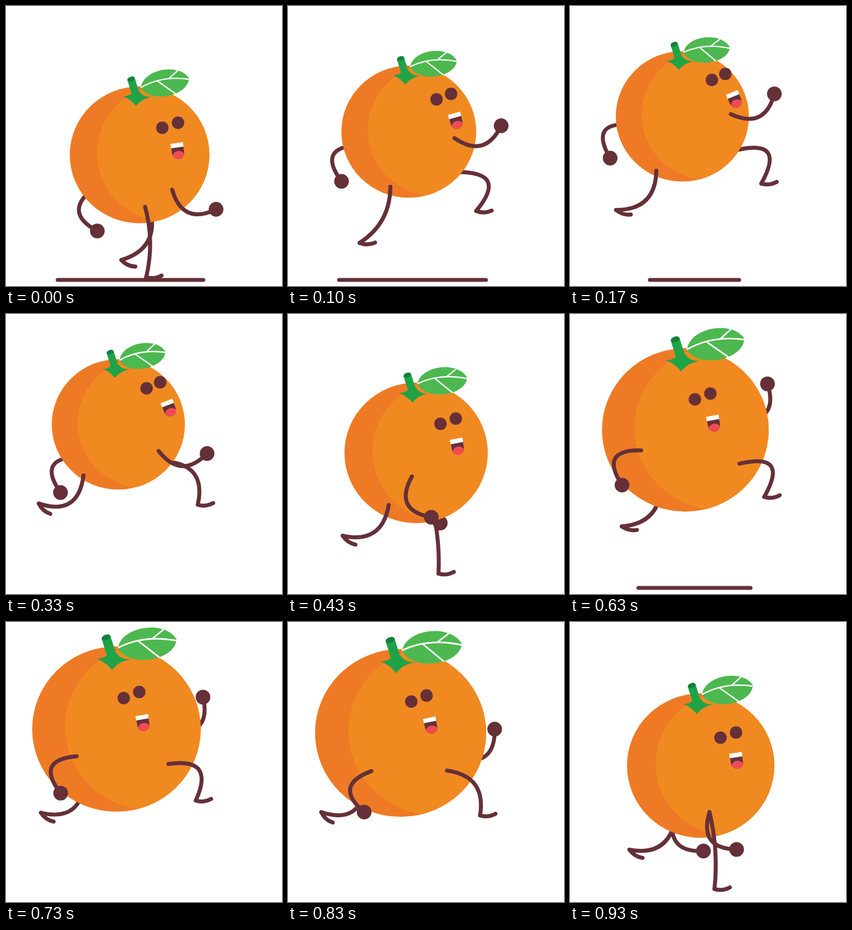
Animation of 500 by 506 pixels, one loop 0.96 s. Source, as an HTML page with a canvas:

```html
<!DOCTYPE html>
<html lang="en">
<head>
<meta charset="utf-8">
<title>Running orange</title>
<style>
  html, body { margin: 0; width: 100%; height: 100%; overflow: hidden; background: #fff; }
  canvas { display: block; }
</style>
</head>
<body>
<canvas id="stage" width="500" height="506"></canvas>
<script>
const ctx = document.getElementById('stage').getContext('2d');
const LOOP = 960, STEPS = 29, STRIDE = STEPS / 2, RAD = Math.PI / 180;
const BROWN = '#653038', SKIN = '#f18921', SHADE = '#ef7a25', STEM = '#1fa347', LEAF = '#4db84f';

// Periodic monotone cubic through rows of [step, ...values].
function track(rows) {
  const n = rows.length;
  const at = i => {
    const turn = Math.floor(i / n), [step, ...values] = rows[i - turn * n];
    return [step + turn * STEPS, ...values];
  };
  const slope = (i, j) => (at(i + 1)[j] - at(i)[j]) / (at(i + 1)[0] - at(i)[0]);
  const tangent = (i, j) => {
    const before = slope(i - 1, j), after = slope(i, j);
    return before * after > 0 ? 2 * before * after / (before + after) : 0;
  };
  return step => {
    let i = n - 1;
    while (i > 0 && rows[i][0] > step) i--;
    const a = at(i), b = at(i + 1), h = b[0] - a[0], u = (step - a[0]) / h, w = 1 - u;
    return a.slice(1).map((v, c) => v * w * w * (1 + 2 * u) + b[c + 1] * u * u * (3 - 2 * u)
      + h * u * w * (w * tangent(i, c + 1) - u * tangent(i + 1, c + 1)));
  };
}

// step, centre height, radius
const bodyTrack = track([
  [0, 269, 126.5], [5, 199.5, 120.5], [7.5, 193, 119.5], [10, 199.5, 120.5], [14.5, 267, 136],
  [16, 259.5, 142], [19, 209.5, 151], [22.5, 193, 153], [25, 200.5, 155], [28, 259.5, 133.5]]);

// step, hip, heel: one run cycle, shared by both legs half a loop apart
const legTrack = track([
  [0, 10, 94, 12, 221], [1.5, -18, 100, -52, 219], [5, -47, 98, -120, 169],
  [10, -63, 92, -144, 143], [13.5, -45, 95, -129, 152], [14.5, 20, 101, -33, 190],
  [16, 70, 91, 76, 175], [19, 98, 61, 143, 121], [25, 84, 68, 144, 149], [28, 16, 84, 25, 223]]);

// step, shoulder, swing angle
const nearArm = track([
  [0, 59, 63, 24], [5, 88, -4, -25], [10, 73, 48, 3], [16, -80, 37, 116],
  [19, -80, 37, 119], [25, -53, 69, 100], [28, 16, 84, 54]]);
const farArm = track([
  [0, -82, 60, 86], [5, -93, 15, 122], [10, -72, 59, 117], [16, 85, 42, -15],
  [19, 101, -15, -55], [25, 105, 48, -40], [28, -49, 90, 50]]);

function disc(x, y, r, color) {
  ctx.fillStyle = color;
  ctx.beginPath();
  ctx.arc(x, y, r, 0, Math.PI * 2);
  ctx.fill();
}

function fillPath(d, color) {
  ctx.fillStyle = color;
  ctx.fill(new Path2D(d));
}

function strokePath(d, color, width, cap = 'round') {
  ctx.strokeStyle = color;
  ctx.lineWidth = width;
  ctx.lineCap = cap;
  ctx.lineJoin = 'round';
  ctx.stroke(new Path2D(d));
}

function placed(x, y, scale, degrees, draw) {
  ctx.save();
  ctx.translate(x, y);
  ctx.scale(scale, scale);
  ctx.rotate(degrees * RAD);
  draw();
  ctx.restore();
}

// Curve whose middle lies `bend` to the side of the straight line.
function bent(ax, ay, bx, by, bend) {
  const dx = bx - ax, dy = by - ay, k = 2 * bend / Math.hypot(dx, dy);
  return `M${ax} ${ay}Q${(ax + bx) / 2 - dy * k} ${(ay + by) / 2 + dx * k} ${bx} ${by}`;
}

function drawArm([x, y, angle]) {
  const reach = 77 + 11 * Math.cos(angle * RAD);
  const handX = x + reach * Math.cos(angle * RAD), handY = y + reach * Math.sin(angle * RAD);
  strokePath(bent(x, y, handX, handY, 35 - (reach - 70) * 0.55), BROWN, 7.2);
  disc(handX, handY, 13.3, BROWN);
}

// The shorter the leg, the more the knee bends; the toe drops while the foot trails.
function drawLeg(phase) {
  const [hipX, hipY, x, y] = legTrack(phase);
  const length = Math.hypot(x - hipX, y - hipY);
  const trail = Math.max(0, Math.sin(Math.PI * (phase - 2.5) / 15.5));
  const angle = (phase < 18 ? -6 + 48 * trail : -6) * RAD;
  const toeX = x + 28 * Math.cos(angle), toeY = y + 28 * Math.sin(angle);
  strokePath(bent(hipX, hipY, x, y, -Math.max(6, 43 - (length - 75) * 0.67)), BROWN, 7.2);
  strokePath(bent(x, y, toeX, toeY, 3), BROWN, 7.2);
}

function drawGround(step) {
  const p = step % STRIDE;
  const length = p < 1 ? 271 + 14 * p : 285 * (1 - ((p - 1) / 5.25) ** 3.3);
  if (length > 7) strokePath(`M${229 - length / 2} 495H${222 + length / 2}`, BROWN, 7);
}

function drawBody(r) {
  ctx.save();
  ctx.scale(1, 0.978);
  disc(0, 0, r, SHADE);
  ctx.clip();
  disc(0.39 * r, -0.025 * r, r, SKIN);
  ctx.restore();
}

function drawStem() {
  strokePath('M-19 -168L-7 -130', STEM, 17, 'butt');
  fillPath('M-36 -129Q-19 -130 -15 -140L0 -140Q8 -127 27 -128Q3 -124 -8 -108Q-18 -122 -36 -129Z', STEM);
  placed(-19, -168, 1, -20, () => {
    ctx.scale(1, 0.6);
    disc(0, 0, 8.5, '#14803a');
  });
}

function drawLeaf() {
  fillPath('M0 2C10 -38 92 -41 109 -2C101 36 18 41 0 2Z', LEAF);
  strokePath('M0 1Q50 -18 109 0M39 -7L74 27M64 -8L87 -23', '#fff', 3, 'butt');
}

function drawMouth() {
  const lips = 'M-11 -7H11V4A11 11 0 0 1 -11 4Z';
  fillPath(lips, BROWN);
  ctx.save();
  ctx.clip(new Path2D(lips));
  disc(0, 12.5, 12, '#f04b55');
  ctx.restore();
  fillPath('M-11.5 -14H11.5V-6H-11.5Z', '#fff');
}

// The face turns once per loop and tips up with every jump.
function drawFace(step, jump) {
  const turn = Math.cos(2 * Math.PI * (step - 7) / STEPS);
  const x = 40 + 21 * turn - 6 * jump, y = -49 - jump * (13 + 6 * turn);
  disc(x, y, 11.3, BROWN);
  disc(x + 28.5 - jump * (2.5 + 2.2 * turn), y - 9 - 2 * jump, 11.3, BROWN);
  placed(x + 28 + jump * (11 + 4 * turn), y + 41.5 - jump * (2 + 5 * turn), 1,
    -8 - jump * (9 + 7 * turn), drawMouth);
}

function drawScene(step) {
  const [y, r] = bodyTrack(step), scale = r / 155;
  const flap = -6.8 - 2.5 * Math.cos(6 * Math.PI * step / STEPS);
  ctx.clearRect(0, 0, 500, 506);
  drawGround(step);
  ctx.save();
  ctx.translate(242 - (269 - y) * 0.555, y);
  drawArm(farArm(step));
  drawLeg((step + STRIDE) % STEPS);
  drawBody(r);
  placed(0, 0, scale, 0, drawStem);
  placed(2.5 * scale, -150 * scale, scale, flap, drawLeaf);
  drawFace(step, (269 - y) / 76);
  drawLeg(step);
  drawArm(nearArm(step));
  ctx.restore();
}

const start = performance.now();
function tick() {
  const time = (performance.now() - start) % LOOP;
  drawScene(Math.min(STEPS - 1, Math.floor(time * 0.03 + 0.11)));
  requestAnimationFrame(tick);
}
tick();
</script>
</body>
</html>
```
